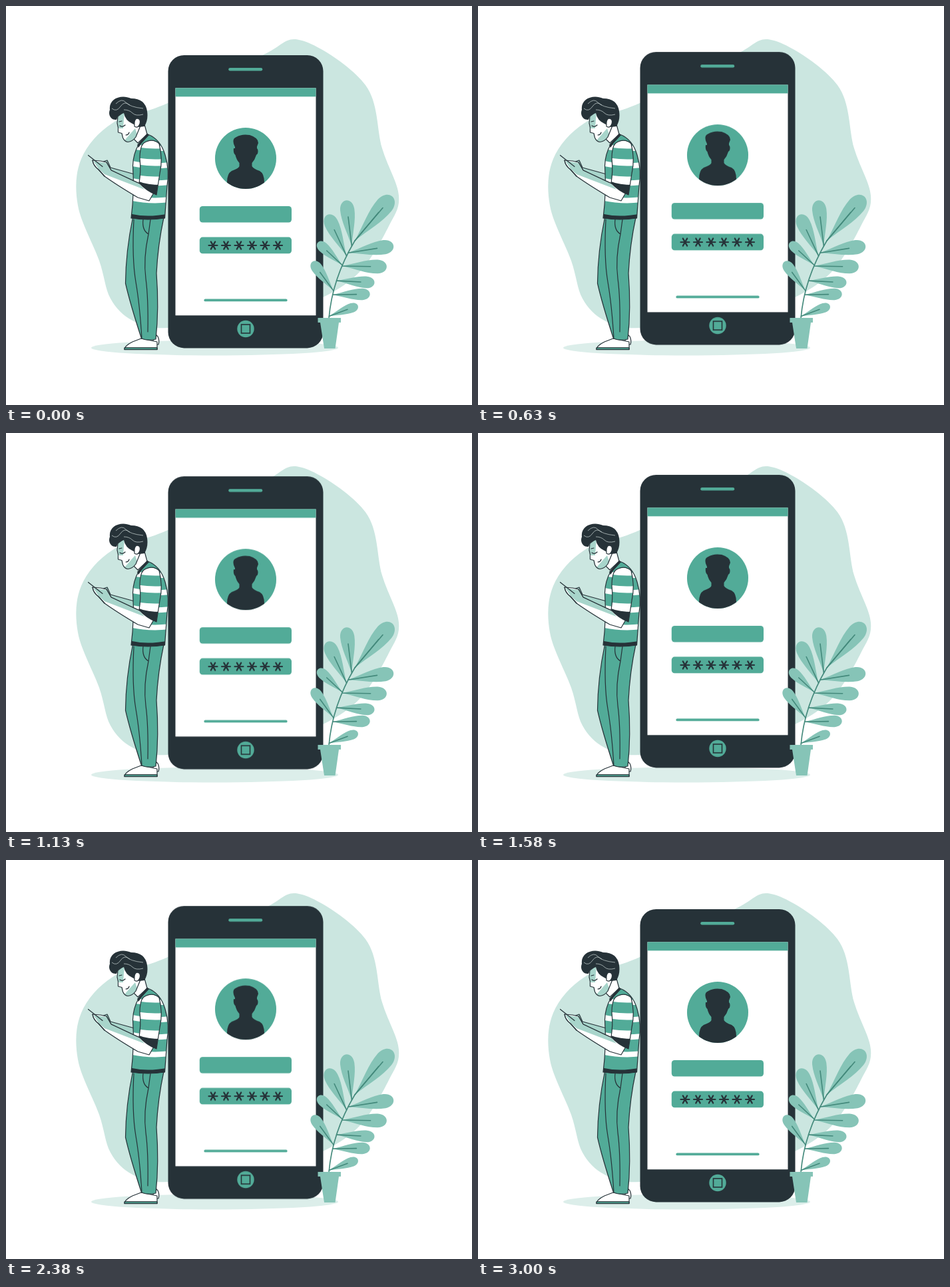
Recreate the animation shown at these times as an HTML page. Size 700x600 px, loop 3.04 s.

```html
<!DOCTYPE html>
<html lang="en">
<head>
<meta charset="utf-8">
<title>Login on a phone</title>
<style>
html, body { margin: 0; width: 100%; height: 100%; overflow: hidden; background: #fff; }
svg { display: block; width: 700px; height: 600px; }
.green { fill: #52ab98; }
.dark { fill: #263238; }
.pale { fill: #cbe6e0; }
.leaf { fill: #86c4b7; }
.tint { fill: #a8d5cb; }
.white { fill: #fff; }
.line { fill: none; }
.ink { stroke: #263238; stroke-width: 1.2; stroke-linecap: round; stroke-linejoin: round; }
.vein { fill: none; stroke: #43897b; stroke-width: 1.6; stroke-linecap: round; }
.bar { fill: none; stroke: #52ab98; stroke-linecap: round; }
</style>
</head>
<body>
<svg viewBox="0 0 700 600">
  <defs>
    <path id="torso" d="M213 193Q232 200 239 224T242 270L238.500 319Q213 323 188 319Q193 280 190.500 240Q191 222 200 207Z"/>
    <path id="sleeve" d="M207 206Q220 198 230 207Q236 230 231 252L226 284Q211 278 200 266Q203 248 201 230Q201 211 207 206Z"/>
    <path id="face" d="M168 166L167 176Q169 182 168.500 190L174 191.500L175.500 198Q178 204 183 204.500Q190 204 195 197L202 180L198 160H176Z"/>
    <clipPath id="inTorso"><use href="#torso"/></clipPath>
    <clipPath id="inSleeve"><use href="#sleeve"/></clipPath>
    <clipPath id="inFace"><use href="#face"/></clipPath>
    <clipPath id="inAvatar"><circle cx="360" cy="229" r="46"/></clipPath>
  </defs>

  <path id="blob" class="pale"/>
  <ellipse cx="313.500" cy="514" rx="185.500" ry="11.500" fill="#dceeea"/>

  <g id="phone">
    <rect class="dark" x="243.500" y="73.900" width="233" height="440.500" rx="24"/>
    <rect class="white" x="254.500" y="123.300" width="211" height="342"/>
    <rect class="green" x="254.500" y="123.300" width="211" height="13"/>
    <path class="bar" stroke-width="4.500" d="M336.500 95.300H383"/>
    <circle class="green" cx="360" cy="229" r="46"/>
    <g class="dark" clip-path="url(#inAvatar)">
      <path d="M344 212Q338 200 346 197Q354 192 366 194Q379 198 379 206L376 214Z"/>
      <path d="M344 208H377V214Q379.500 216 378 222L376 224Q374 231 369.500 236V241Q372 245 381 248Q388 252 388 265V276H332V265Q332 252 339 248Q350 244 350.500 241V236Q346 231 344.500 224Q341 221 342 214H344Z"/>
    </g>
    <rect class="green" x="290.800" y="301" width="138.200" height="24.600" rx="4.500"/>
    <rect class="green" x="290.800" y="347.600" width="138.200" height="24.600" rx="4.500"/>
    <path id="stars" class="line" stroke="#263238" stroke-width="2.200" stroke-linecap="round"/>
    <path class="bar" stroke-width="3.800" d="M299.300 442.400H420.700"/>
    <circle class="green" cx="360" cy="485.500" r="12.700"/>
    <rect class="line" x="353.500" y="479" width="13" height="13" stroke="#263238" stroke-width="1.600"/>
  </g>

  <g id="man">
    <!-- shoes and trousers -->
    <path class="white ink" d="M223 492L228 497Q231 503 229 509H220Z"/>
    <path class="white ink" d="M203 500L190 505Q178 511 178 516.500H227V505Z"/>
    <path class="green ink" d="M178 513.800H227V516.700H178Z"/>
    <path class="green ink" d="M190.500 318Q180 368 179.500 417Q186 446 203.500 500Q214 504 225 501Q230 455 226 402Q228 360 237 318Z"/>
    <path class="ink line" d="M192 321Q189 380 195 415T204 500M206 321Q204 337 214 343L217 321M214 343Q206 380 210 410T213 490"/>

    <!-- far arm -->
    <path class="tint ink" d="M143 235L152 232L157 243L193 253L203 261V270L155 250Z"/>

    <!-- shirt -->
    <g clip-path="url(#inTorso)">
      <use href="#torso" class="green"/>
      <path id="torsoStripes" class="line" stroke="#fff" stroke-width="8"/>
      <path class="dark" d="M185 312Q211 319 246 312V325H185Z"/>
    </g>
    <use href="#torso" class="line ink"/>

    <!-- neck and collar -->
    <path class="white ink" d="M190 198L198 206L212 193L208 178H200Z"/>
    <path class="dark" d="M197 209L212 191.500L215 194L204 206L199 213Z"/>

    <!-- near arm and handset -->
    <path class="white ink" d="M201 267L186 261L158 247L151 235L142 233L130 232Q131 240 139 246L148 256Q166 269 198 288L215 293L223 279Z"/>
    <path class="tint" d="M131 233L151 236L157 247L201 268L208 276L148 253L139 245Z"/>
    <path class="ink line" d="M151 235L158 247L201 267M130 232Q131 240 139 246L148 256"/>
    <path class="ink line" stroke-width="2" d="M123.500 224.500L145 241.500"/>

    <!-- sleeve -->
    <g clip-path="url(#inSleeve)">
      <use href="#sleeve" class="white"/>
      <path id="sleeveStripes" class="line" stroke="#52ab98" stroke-width="16"/>
      <path class="dark" d="M196 262Q210 270 240 269V288H196Z"/>
    </g>
    <use href="#sleeve" class="line ink"/>

    <!-- head -->
    <use href="#face" class="white"/>
    <g clip-path="url(#inFace)">
      <path class="tint" d="M162 158H178L176 184H163ZM178 202L194 184L198 196L188 207Z"/>
    </g>
    <use href="#face" class="line ink"/>
    <path class="ink line" d="M171 180Q175 183 179 179M170 174L174 173M180 194Q184 194 185 190"/>
    <path class="dark" d="M177 161Q168 163 166 171C157 172 153 163 156 156C154 140 172 132 188 139Q209 139 212 158Q214 171 208 181L200 182L190 177Q179 172 177 161Z"/>
    <path class="white ink" d="M193 181Q192 170 197 169Q203 170 201 177Q199 183 195 182Z"/>
    <path class="line" stroke="#b9c5c5" stroke-width=".8" d="M159 154Q166 160 172 151T186 149M165 147Q174 138 180 145T206 154M177 156Q185 156 190 161T206 163"/>
  </g>

  <g id="plant">
    <g id="leaves" class="leaf"></g>
    <path id="veins" class="vein"/>
    <path class="vein" d="M485 470Q490 410 524 353L566 303.500"/>
    <path class="leaf" d="M468.500 469H503V476H500L494.500 515H478L472 476H468.500Z"/>
  </g>
</svg>
<script>
const byId = id => document.getElementById(id);
const setPath = (id, d) => byId(id).setAttribute("d", d);
const repeat = (n, make) => Array.from({ length: n }, (_, i) => make(i)).join("");

// Closed curve running smoothly through all points
function smooth(points) {
  const at = i => points[(i + points.length) % points.length];
  const handle = (i, sign) => [0, 1].map(k => at(i)[k] + sign * (at(i + 1)[k] - at(i - 1)[k]) / 6);
  return `M${at(0)}` + repeat(points.length, i =>
    `C${handle(i, 1)} ${handle(i + 1, -1)} ${at(i + 1)}`) + "Z";
}

setPath("blob", smooth([
  [243, 146], [160, 176], [113, 230], [108, 300], [140, 383], [157, 440], [190, 473], [243, 484],
  [400, 465], [476, 438], [533, 398], [575, 331], [590, 285], [565, 214], [540, 119], [445, 52], [385, 74]
]));

// Six password marks, each made of three crossing strokes
setPath("stars", repeat(6, i => repeat(3, j => {
  const turn = j * Math.PI / 3, dx = 6.5 * Math.cos(turn), dy = 6.5 * Math.sin(turn);
  return `M${311 + 19.5 * i - dx} ${360 - dy}l${2 * dx} ${2 * dy}`;
})));

const stripes = (n, top, gap) => repeat(n, i => `M185 ${top + gap * i}q30 7 62 3`);
setPath("torsoStripes", stripes(4, 210, 26));
setPath("sleeveStripes", stripes(2, 218, 26));

// Leaves grow from the stem: place along it (0 to 1), angle, length
const leaves = [
  [.03, -20, 46], [.3, -1, 56], [.48, 3, 57], [.67, 1, 67], [.84, -9, 69],
  [.35, -126, 54], [.68, -137, 50], [.8, -115, 68], [.93, -97, 69], [1, -50, 87]
];
const stem = t => [485 + 10 * t + 29 * t * t, 470 - 120 * t + 3 * t * t];

// Teardrop pointing right, one unit long
const teardrop = "M0 0C.3-.06.55-.16.8-.155C1.07-.14 1.07.14.8.155C.55.16.3.06 0 0Z";

byId("leaves").innerHTML = leaves.map(([t, angle, size]) =>
  `<path d="${teardrop}" transform="translate(${stem(t)}) rotate(${angle}) scale(${size})"/>`).join("");

setPath("veins", leaves.map(([t, angle, size]) => {
  const turn = angle * Math.PI / 180, reach = .64 * size;
  return `M${stem(t)}l${reach * Math.cos(turn)} ${reach * Math.sin(turn)}`;
}).join(""));

// The phone floats steadily up and down, then rests for one beat
const loop = 3040, half = 1500;
const shift = (time, y) => ({ offset: time / loop, transform: `translateY(${y}px)` });
byId("phone").animate(
  [shift(0, 0), shift(half, -11.7), shift(2 * half, 0), shift(loop, 0)],
  { duration: loop, iterations: Infinity }
);
</script>
</body>
</html>
```
